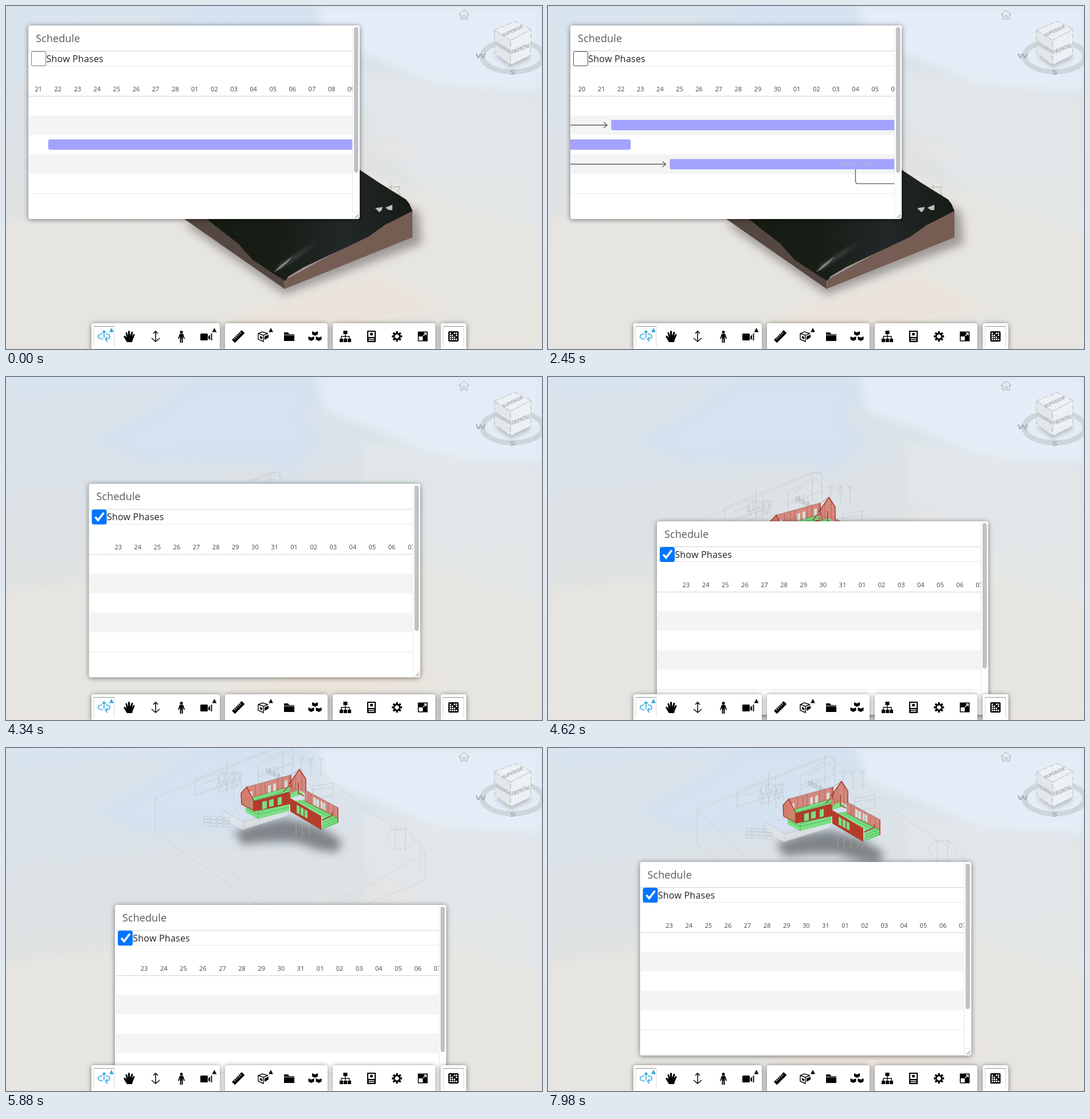
Animation of 935 by 599 pixels, one loop 8 s. Source, as an HTML page:

```html
<!DOCTYPE html>
<html lang="en">
<head>
<meta charset="utf-8">
<title>Schedule</title>
<style>
html, body { margin: 0; width: 100%; height: 100%; overflow: hidden; background: #e2e4e4; }
svg { display: block; }
text { font-family: "Open Sans", "Noto Sans", sans-serif; }
.card { fill: #fff; filter: drop-shadow(0 1px 4px rgba(0,0,0,.5)); }
.wire { fill: none; stroke: #b4babd; stroke-width: .55; }
.ground.wire, .edge { stroke: #c3c7c9; }
.rule { stroke: #d4d4d4; }
.day { font-size: 11px; fill: #444; text-anchor: middle; }
.tag { font-size: 11px; fill: #bbb; fill-opacity: .65; text-anchor: middle; }
.dep { fill: none; stroke: #5f5f5f; stroke-width: 1.4; }
.line { fill: none; stroke: #111; stroke-width: 2; }
.face { fill: #eef1f4; stroke: #b3b8bd; stroke-width: 1; stroke-dasharray: 9 3; }
.side { font: bold 9px "Open Sans", sans-serif; fill: #a3a9b0; text-anchor: middle; }
.wind { font: bold 14px "Open Sans", sans-serif; fill: #a9aeb3; text-anchor: middle; }
.pink { fill: #d5796b; fill-opacity: .85; }
.red { fill: #b33d2a; }
.green { fill: #7be085; }
.pane { fill: #d5ddd9; }
.frame { fill: none; stroke: #a53425; stroke-width: 1.4; }
.stud { fill: none; stroke: #6d3b31; stroke-width: .6; stroke-opacity: .7; }
.joist { fill: none; stroke: #3fa34a; stroke-width: .7; }
</style>
</head>
<body>
<svg id="stage" width="935" height="599" viewBox="0 0 935 599">
  <defs>
    <linearGradient id="sky" x2="0.12" y2="1">
      <stop offset="0" stop-color="#d8e4ee"/><stop offset=".45" stop-color="#dde2e5"/>
      <stop offset=".7" stop-color="#e3e3e1"/><stop offset="1" stop-color="#e7e4e0"/>
    </linearGradient>
    <linearGradient id="soil" x2="1" y2="0">
      <stop offset="0" stop-color="#131a11"/><stop offset=".5" stop-color="#171d15"/>
      <stop offset=".75" stop-color="#232829"/><stop offset="1" stop-color="#151b13"/>
    </linearGradient>
    <filter id="soft" x="-30%" y="-60%" width="160%" height="220%"><feGaussianBlur stdDeviation="8"/></filter>
    <filter id="haze" x="-30%" y="-30%" width="160%" height="160%"><feGaussianBlur stdDeviation="3"/></filter>
    <clipPath id="view"><rect y="72" width="565" height="266"/></clipPath>
  </defs>

  <rect width="935" height="599" fill="url(#sky)"/>
  <g filter="url(#soft)">
    <path d="M330 0H560L520 70L555 110L500 168L420 150L240 150L150 110L250 60Z" fill="#d4e2f0" opacity=".8"/>
    <path d="M540 0H935V150L760 140L640 90L560 60Z" fill="#e4edf7"/>
    <path d="M620 110L935 160V420L760 350L630 230Z" fill="#e5e9ec" opacity=".6"/>
    <path d="M0 378L150 355L300 372L560 270L935 400V599H0Z" fill="#e7e5e1"/>
    <path d="M370 555L520 505L640 470L760 530L600 560Z" fill="#eae3da"/>
  </g>
  <path d="M624 238L665 231L694 240L706 266L660 275L624 270Z" fill="#ebe3dc" opacity=".4" filter="url(#haze)"/>

  <g id="scene">
    <g id="solid">
      <path d="M310 380L486 504L725 415L720 360L600 300Z" fill="#55504d" opacity=".5" filter="url(#soft)"/>
      <path d="M238 321L486 494V478L350 372L238 260Z" fill="#544641"/>
      <path d="M486 494L709 404V356L630 400L487 478Z" fill="#755d54"/>
      <path class="ground" fill="url(#soil)"/>
      <path d="M468 464L477 453L500 438L545 410L512 436L484 455Z" fill="#7b8182" opacity=".5" filter="url(#haze)"/>
      <path d="M467 465L480 452L500 437L490 449L478 459Z" fill="#b4b5b3" opacity=".6"/>
      <path d="M398 397L411 399" stroke="#1e2531"/>
      <path d="M644 353L657 351Q656 358 651 360ZM662 352L674 347V356Q668 358 662 352Z" fill="#b9bfc3"/>
      <path class="wire" d="M666 316H680M672 309V323M678 317L687 315L684 323L688 330L680 327" style="stroke:#888"/>
    </g>
    <g id="ghost">
      <path class="wire ground"/>
      <path class="wire edge" d="M238 260V321L486 494L709 404V357M487 480V494M701 343V384"/>
      <g transform="translate(-22 173)">
        <path d="M398 146L436 132L490 122L545 136L586 162L578 182L545 178L505 164L460 164L412 168Z" fill="#5d6162" opacity=".72" filter="url(#soft)"/>
        <path d="M377 110L414 130L492 108V118L412 143L392 134Z" fill="#e2e5e6" opacity=".8"/>
        <path class="wire" d="M377 108L414 129L492 108M377 125L412 143L492 118M377 108V125M414 129V143M400 107L440 88"/>
        <path class="wire" d="M330 55L483 -6H500V40M440 28V72M440 28L483 3M452 27L490 5L500 20M483 -6V45M346 62L372 52V78L410 62M440 45L470 33L476 45M440 51L500 25M330 55V82L410 55M535 67L570 61V83L535 90ZM535 73L570 68"/>
        <path class="wire" d="M453 36L485 52M453 39L485 55M453 42L485 58M460 34V42M468 38V48M476 43V54" style="stroke:#858b8f"/>
        <g id="wires" class="wire"></g>
        <path class="green" d="M418 103L432 109L494 94V110L440 124L418 112Z"/>
        <path class="joist" d="M440 124V111L494 97M418 106L440 116L494 103"/>
        <path class="green" d="M410 97L430 84L497 64L520 80L494 88L432 108Z"/>
        <path class="joist" d="M416 97L497 72M422 99L497 77M428 101L500 80"/>
        <path class="pink" d="M410 79L420 68L497 47V67L428 87L410 97Z"/>
        <path class="pane" d="M425 77L430 75V85L425 87ZM457 66L462 64V78L457 79ZM466 63L471 61V75L466 76ZM486 58L491 56V68L486 69Z"/>
        <path class="stud" d="M420 68L497 47M428 87L497 67M435 65V85M445 62V82M452 60V80M474 54V74M482 52V71M494 48V68"/>
        <path class="pink" d="M410 79L420 68L432 92V109L411 98Z"/>
        <path class="frame" d="M410 79L420 68L432 92V109L411 98Z"/>
        <path class="red" d="M431 93L496 76V98L432 111Z"/>
        <path class="green" d="M447 94L455 92V105L447 107ZM459 91L467 89V101L459 103ZM474 87L481 85V98L474 100Z"/>
        <path class="stud" d="M432 93L496 76M443 91V108M470 84V101M488 79V99"/>
        <path class="pink" d="M494 63L512 37L523 54V80L511 73L494 80Z"/>
        <path class="frame" d="M494 63L512 37L523 54V80M497 47V69M510 61V79L520 84M484 76L494 66"/>
        <path class="stud" d="M500 56V76M505 48V74M516 43V76M497 47L511 38"/>
        <path class="green" d="M504 92L522 90L578 120V132L552 142V120Z"/>
        <path class="joist" d="M512 92L572 125M518 91L578 124M552 131L578 121M552 136L578 126M552 140L578 130"/>
        <path class="pink" d="M521 73L579 104V122L521 93Z"/>
        <path class="pane" d="M536 85L546 91V104L536 99ZM549 92L557 97V109L549 105Z"/>
        <path class="stud" d="M521 73L579 104M521 93L579 122M528 77V96M532 79V98M541 84V102M553 90V108M562 95V113M571 100V117"/>
        <path class="red" d="M495 87L550 119V143L496 111Z"/>
        <path class="green" d="M507 99L526 110V123L507 113Z"/>
        <path class="frame" d="M513 102V117M520 106V120M579 104V131M569 112V118L551 126"/>
      </g>
    </g>
  </g>

  <g id="compass">
    <path d="M790 15L799 7L808 15H805V23H801V17H797V23H793V15Z" fill="#e5ebf1" stroke="#a3a8ad"/>
    <ellipse cx="884" cy="88" rx="53" ry="27" fill="none" stroke="#cbd1d6" stroke-width="9" opacity=".85"/>
    <path d="M852 88L880 108L916 92L908 78Z" fill="#b4bac0" opacity=".8" filter="url(#haze)"/>
    <path class="face" d="M852 42L888 27L916 41L880 60Z"/>
    <path class="face" d="M852 42L880 60V103L852 82Z" style="fill:#e3e7ea"/>
    <path class="face" d="M880 60L916 41L915 86L880 103Z"/>
    <text class="side" transform="matrix(.78 -.36 .4 .8 885 46)">SUPERIOR</text>
    <text class="side" transform="matrix(.54 .32 0 1 866 75)">ESQUERDA</text>
    <text class="side" transform="matrix(.8 -.33 0 1.15 898 78)">FRONTAL</text>
    <text class="wind" transform="translate(828 91) scale(1.35 .8)">W</text>
    <text class="wind" transform="translate(884 120) scale(1.35 .8)">S</text>
    <text class="wind" transform="translate(938 91) scale(1.35 .8)">E</text>
  </g>

  <g id="panel">
    <rect class="card" width="578" height="338" rx="4"/>
    <text x="13" y="28.500" font-size="18" letter-spacing=".1" fill="#5a5a5a">Schedule</text>
    <path class="rule" d="M0 44.500H565" stroke="#ccc"/>
    <path d="M0 70.500H565M565.500 1V337M566 325.500H577" stroke="#e8e8e8"/>
    <rect id="box" x="5.500" y="45.500" width="25" height="25" rx="2.500"/>
    <path id="tick" d="M11 58L16 63.500L26 50.500" fill="none" stroke="#fff" stroke-width="3.600"/>
    <text x="31.300" y="63.500" font-size="16" letter-spacing=".23" fill="#222">Show Phases</text>
    <path d="M1 157H565V191H1ZM1 225H565V259H1Z" fill="#f4f4f4"/>
    <path class="rule" d="M0 123.500H565"/>
    <path d="M0 293.500H565" stroke="#ebebeb"/>
    <g id="chart" clip-path="url(#view)"></g>
    <rect x="568" y="3" width="7.500" height="254" rx="3.700" fill="#c1c1c1"/>
    <path d="M570 336L576 330M574 336L576 334" stroke="#555"/>
  </g>

  <g id="bar"></g>
</svg>
<script>
const $ = id => document.getElementById(id);
const LOOP = 8000, TICK = 70, DAY = 34.1;
const CHECKED = 2660, FADED = 2730, REWOUND = 3920;

// Day numbers count from 1 February; row 0 is the first task lane.
const tasks = [
  { row: 1, from: 79.5, to: 110.5 },
  { row: 2, from: 20.5, to: 80.5 },
  { row: 3, from: 82.5, to: 101.5, name: 'Floors - 300' },
  { row: 4, from: 109.5, to: 124.5, name: 'SIP Walls' }
];
const links = [[1, 0], [1, 2], [2, 3]];

const scrollKeys = [[280, 664.5], [1120, 1720], [1820, 2632], [2100, 2632], [2240, 2639.8], [3010, 2639.8], [3850, 3562]];
const panelKeys = [[3850, 39, 34], [4620, 190, 252], [4690, 190, 252], [5110, 190, 274],
  [6790, 190, 274], [6930, 153, 203], [7070, 150, 197], [7280, 150, 197], [7630, 160.5, 199]];
const sceneKeys = [[5320, 0, 0], [5880, 22, -173], [5950, 22, -173], [6160, 22, -152]];

function at(keys, t) {
  const n = keys.findIndex(k => k[0] > t);
  if (n === 0) return keys[0].slice(1);
  if (n < 0) return keys[keys.length - 1].slice(1);
  const a = keys[n - 1], b = keys[n], u = (t - a[0]) / (b[0] - a[0]);
  const e = u * u * (3 - 2 * u);
  return a.slice(1).map((v, i) => v + (b[i + 1] - v) * e);
}

const rowY = row => 139.8 + row * 34.15;
const mid = task => (task.from + task.to) / 2;

function drawChart(scroll, phased) {
  const x = d => d * DAY - scroll;
  let out = '';
  const first = Math.max(-9, Math.floor(scroll / DAY) - 1);
  for (let d = first; x(d) < 585; d++) {
    const date = new Date(2023, 1, 1 + d).getDate();
    out += `<text class="day" x="${x(d)}" y="115">${String(date).padStart(2, '0')}</text>`;
    out += `<path d="M${x(d - .5)} 121V123" stroke="#e4e4e4"/>`;
  }
  for (const [a, b] of links) {
    const p = tasks[a], q = tasks[b], down = q.row > p.row ? 1 : -1;
    const y = rowY(q.row), sx = x(mid(p)), end = x(q.from) - 7;
    out += `<path class="dep" d="M${sx} ${rowY(p.row)}V${y - 5 * down}Q${sx} ${y} ${sx + 5} ${y}H${end}m-6 -5l6 5l-6 5"/>`;
  }
  for (const k of tasks) {
    const y = rowY(k.row) - 9, w = (k.to - k.from) * DAY, c = x(mid(k));
    out += `<rect x="${x(k.from)}" y="${y}" width="${w}" height="18" rx="3" fill="${phased ? '#f83a0d' : '#a3a3ff'}"/>`;
    if (phased) out += `<rect x="${x(k.from)}" y="${y}" width="${w / 2}" height="18" rx="3" fill="#a3a3ff"/>`;
    if (k.name) out += `<text class="tag" x="${c}" y="${y + 13}">${k.name}</text>`;
  }
  $('chart').innerHTML = out;
}

function drawWires() {
  let d = '';
  for (const x of [515, 532, 549]) d += `M${x} 50V20l-6 -3M${x} 20l5 -4M${x} 20l-4 5M${x} 20l6 2`;
  for (let c = 0; c < 4; c++)
    for (let r = 0; r < 3; r++) d += `M${345 + c * 12} ${119 + r * 6 + c * .7}h10v5h-10z`;
  for (let i = 0; i < 5; i++) {
    const x = 369 + i * 9, h = 7 + 6 * Math.sin(i * 2.1);
    d += `M${x} ${52 - h}L${x + 7} ${60 + h}M${x + 7} ${46 - h / 2}L${x - 3} ${64 + h / 2}`;
  }
  d += 'M385 22V82M397 30V86M378 44H412M370 62L412 50';
  d += 'M679 139V180M697 137V181M663 155L672 143L699 141L713 156';
  for (const x of [506, 517, 529, 541]) d += `M${x} 122V${150 + (x % 7)}`;
  $('wires').innerHTML = `<path d="${d}"/><path d="M713 156L705 174L674 177L663 155" stroke-dasharray="4 3"/>`;
}

function drawToolbar() {
  const card = (x, w) => `<rect class="card" x="${x}" y="554" width="${w}" height="48" rx="4"/>`;
  const active = x => `<path d="M${x} 595V559.5H${x + 36}V595" fill="none" stroke="#d5d8da"/><path d="M${x} 559.500h36" stroke="#8f9396"/>`;
  const flag = (x, c) => `<path d="M${x - 4} 569.500L${x} 562L${x + 4} 569.500Z" fill="${c}"/>`;
  const icon = (x, body) => `<g transform="translate(${x} 577)">${body}</g>`;
  const fill = d => `<path d="${d}"/>`;
  const line = (d, extra = '') => `<path class="line" d="${d}" ${extra}/>`;
  const cube = (x, y) => fill(`M${x} ${y - 4}l-5 -2v5.500l5 2.500l5 -2.500v-5.500z`);
  const blue = 'style="stroke:#2fa8df;stroke-width:1.6"';

  let teeth = '', cells = '', marks = '';
  for (let a = 0; a < 360; a += 45) teeth += `<rect x="-1.700" y="-9" width="3.400" height="4" transform="rotate(${a})"/>`;
  for (let i = 0; i < 16; i++)
    if (i % 5 !== 1) cells += `<rect x="${-6.7 + i % 4 * 3.6}" y="${-6.7 + (i >> 2) * 3.6}" width="2.500" height="2.500" fill="#fff"/>`;
  for (let i = -7; i < 9; i += 3.5) marks += `M${i} -4v4`;

  $('bar').innerHTML = [
    card(149, 224), card(382, 179), card(570, 179), card(758.5, 44.5),
    active(153), active(762.5), flag(184, '#2fa8df'), flag(363.5, '#111'), flag(462, '#111'),
    icon(171, line('M-3 -4.500C-13 -3.500 -13 4 -2 4.500M3 -4.500C13 -3.500 12 4 3 5M0 -10V3M-3 -6.500L0 -10L3 -6.500M6 1L2.500 5L6 9', blue)),
    icon(215, fill('M-4 10L-9.500 1Q-10 -2 -7 -1L-4.500 2L-6.500 -6Q-6 -8.500 -4 -7L-2 -1V-9Q-.5 -11 1 -9L1.500 -1L4 -8Q6 -9 6.500 -7L5 0L7.500 -4Q9.500 -5 9.500 -2.500L6 6L5 10Z')),
    icon(261, line('M0 -8V8M-4 -5L0 -9L4 -5M-7 3L0 9L7 3', 'style="stroke-width:1.6"')),
    icon(306, '<circle cy="-7.500" r="2.500"/>' + fill('M-3 -4.500H3L6 4L4.500 4.500L2.500 -.5V11H.5V4H-.5V11H-2.500V-.5L-4.500 4.500L-6 4Z')),
    icon(349, '<rect x="-10" y="-5" width="13" height="12" rx="1.500"/>' + fill('M4 0L7 -3V6L4 4Z') + line('M9.500 -5V7')),
    icon(405, `<g transform="rotate(-45)"><rect x="-12" y="-3.500" width="24" height="7.500"/><path d="${marks}" stroke="#fff" stroke-width="1"/></g>`),
    icon(449, line('M8 -5L-2 -8L-9 -5V5L0 9V-2L-9 -5M0 -2L8 -5', 'style="stroke-width:1.5"') + fill('M-6 -1L-2 1V5L-6 3ZM2 0L9 -3V2L2 6Z')),
    icon(494, fill('M-9 -7H-2L0 -4H9V8H-9Z')) + `<path d="M485 574.500h18" stroke="#fff" stroke-width=".8"/>`,
    icon(539, cube(0, -3) + cube(-6.5, 6) + cube(6.5, 6)),
    icon(592, '<rect x="-3.500" y="-10" width="7" height="6"/><rect x="-10" y="4" width="6" height="6"/><rect x="-3" y="4" width="6" height="6"/><rect x="4" y="4" width="6" height="6"/>' + line('M0 -4V4M-7 4V0H7V4', 'style="stroke-width:1.4"')),
    icon(637.5, '<rect x="-7.500" y="-10" width="15" height="20" rx="1"/><rect x="-5.500" y="-8" width="11" height="9" fill="#fff"/><circle cy="-4" r="2.500"/><path d="M-5 4H5M-5 7H5" stroke="#fff" stroke-width="1.500"/>'),
    icon(682, teeth + '<circle r="5" fill="none" stroke="#111" stroke-width="2.800"/>'),
    icon(727, '<rect x="-8.500" y="-8.500" width="17" height="17"/><path d="M-7 0H0V7H-7Z" fill="#fff"/><path d="M1 -1L6 -6M2 -6H6V-2" fill="none" stroke="#fff" stroke-width="1.500"/>'),
    icon(780.5, '<rect x="-9" y="-9" width="18" height="18" rx="2"/>' + cells)
  ].join('');
}

const ground = 'M238 260L468 167L570 250L617 286L650 308L698 338L704 346L709 358L660 383L632 403L590 423L560 437L520 456L493 472L487 480L466 467L430 443L405 415L370 388L350 372Z';
document.querySelectorAll('.ground').forEach(p => p.setAttribute('d', ground));
drawWires();
drawToolbar();

const move = (id, [x, y]) => $(id).setAttribute('transform', `translate(${x} ${y})`);
const show = (id, on) => $(id).setAttribute('visibility', on ? 'visible' : 'hidden');
let last = -1;

function render(t) {
  const checked = t >= CHECKED, faded = t >= FADED;
  move('panel', at(panelKeys, t));
  move('scene', at(sceneKeys, t));
  show('solid', !faded);
  show('ghost', faded);
  show('tick', checked);
  $('box').setAttribute('fill', checked ? '#0075ff' : '#fff');
  $('box').setAttribute('stroke', checked ? '#0075ff' : t >= 2450 ? '#4f4f4f' : '#767676');
  drawChart(t >= REWOUND ? -358 : at(scrollKeys, t)[0], checked);
}

function frame(now) {
  const t = Math.floor(now % LOOP / TICK) * TICK;
  if (t !== last) render(last = t);
  requestAnimationFrame(frame);
}
render(0);
requestAnimationFrame(frame);
</script>
</body>
</html>
```
